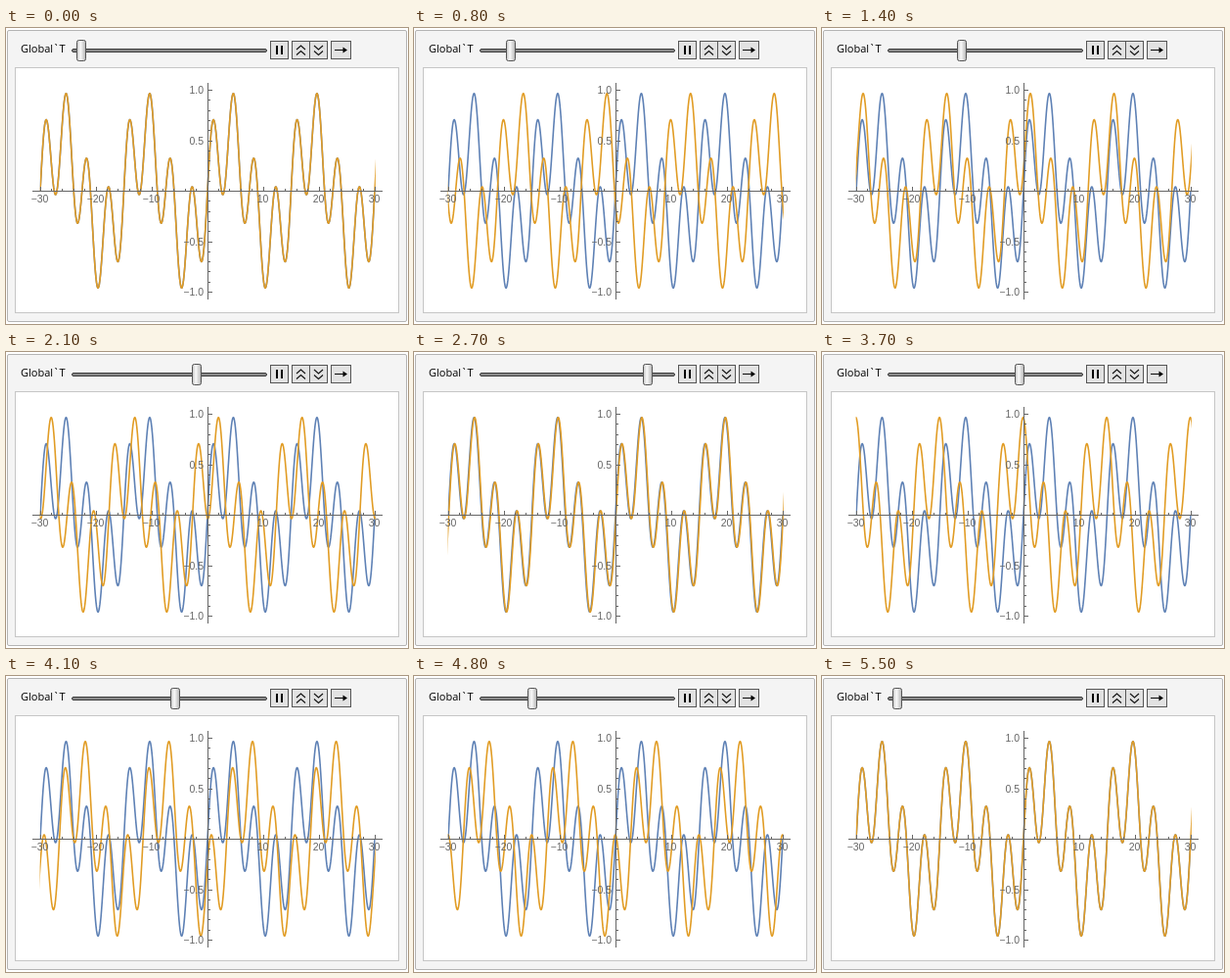
An HTML page for the animation above (6 s loop, 411 by 302 pixels).

```html
<!DOCTYPE html>
<html lang="en">
<head>
<meta charset="utf-8">
<title>Travelling wave</title>
<style>
  html, body { margin: 0; width: 100%; height: 100%; overflow: hidden; background: #fff; }
  svg { display: block; }
  .label { font: 11px "Open Sans", sans-serif; fill: #000; }
  #axes text { font: 10.5px "Liberation Sans", Arial, sans-serif; fill: #666; }
  #axes path { stroke: #666; fill: none; shape-rendering: crispEdges; }
  .curve { fill: none; stroke-width: 1.6; stroke-linejoin: round; }
  .button { fill: #e2e2e2; stroke: #555; }
  .icon { fill: none; stroke: #111; stroke-width: 1.1; }
</style>
</head>
<body>
<svg width="411" height="302" viewBox="0 0 411 302">
  <defs>
    <linearGradient id="metal">
      <stop offset="0" stop-color="#c4c4c4"/>
      <stop offset=".4" stop-color="#fafafa"/>
      <stop offset="1" stop-color="#b4b4b4"/>
    </linearGradient>
    <clipPath id="plot"><rect x="34.6" y="42" width="343.2" height="247"/></clipPath>
  </defs>

  <rect x="1.5" y="2.5" width="408" height="297" rx="1.5" fill="#f4f4f4" stroke="#b4b4b4"/>
  <rect x="9.5" y="40.5" width="392" height="250" fill="#fff" stroke="#c6c6c6"/>

  <text class="label" x="15" y="25">Global`T</text>
  <rect x="67.5" y="21.5" width="199" height="3" rx="1.5" fill="#8a8a8a" stroke="#3c3c3c"/>
  <rect id="thumb" x="-4.5" y="12.5" width="9" height="21" rx="2" fill="url(#metal)" stroke="#555"/>

  <g class="button">
    <rect x="270.5" y="13.5" width="18" height="18"/>
    <rect x="292.5" y="13.5" width="18" height="18"/>
    <rect x="310.5" y="13.5" width="18" height="18"/>
    <rect x="332.5" y="13.5" width="20" height="18"/>
  </g>
  <path d="M276 18h2v9h-2zM281 18h2v9h-2z"/>
  <path class="icon" d="M297 22l4.500-4 4.500 4M297 27.500l4.500-4 4.500 4"/>
  <path class="icon" d="M315 18l4.500 4 4.500-4M315 23.500l4.500 4 4.500-4"/>
  <path class="icon" d="M336 22.500h10"/>
  <path d="M344.500 19.500l4.500 3-4.500 3z"/>

  <g clip-path="url(#plot)">
    <path id="fixed" class="curve" stroke="#5e81b5"/>
    <path id="moving" class="curve" stroke="#e19c24"/>
  </g>
  <g id="axes"></g>
</svg>
<script>
const $ = id => document.getElementById(id);
const X0 = 206, Y0 = 166, UX = 5.7, UY = 103;
const T_MIN = 0.05, T_MAX = 50, SAMPLES = 50;

const wave = x => Math.sin(Math.PI * x / 3) * Math.cos(Math.PI * x / 5);

function curve(from, to) {
  const points = [];
  for (let i = from * 10; i <= to * 10; i++) {
    const x = i / 10;
    points.push((X0 + x * UX).toFixed(2) + ' ' + (Y0 - wave(x) * UY).toFixed(2));
  }
  return 'M' + points.join('L');
}

function drawAxes() {
  let d = 'M27 166.5H385M206.5 56V277';
  let labels = '';
  const text = (x, y, anchor, value) => {
    labels += `<text x="${x}" y="${y}" text-anchor="${anchor}">${value.replace('-', '\u2212')}</text>`;
  };
  for (let v = -30; v <= 30; v += 2) {
    const x = Math.floor(X0 + v * UX) + 0.5, major = v % 10 === 0;
    d += `M${x} 166v${major ? -4 : -2}`;
    if (major && v) text(X0 + v * UX - 0.5, 178, 'middle', String(v));
  }
  for (let n = -10; n <= 10; n++) {
    const y = Math.round(Y0 - n / 10 * UY) + 0.5, major = n % 5 === 0;
    d += `M207 ${y}h${major ? 4 : 2}`;
    if (major && n) text(202, y + 3, 'end', (n / 10).toFixed(1));
  }
  $('axes').innerHTML = `<path d="${d}"/>` + labels;
}

// T sweeps up and back in 100 ms steps, resting at zero for 500 ms at each end.
function valueAt(ms) {
  const step = Math.floor(ms / 100) - 5;
  if (step < 0 || step >= SAMPLES) return 0;
  const rise = 1 - Math.abs(2 * step / (SAMPLES - 1) - 1);
  return T_MIN + (T_MAX - T_MIN) * rise;
}

function render() {
  const T = valueAt(performance.now() % 6000);
  $('moving').setAttribute('transform', `translate(${-T * UX} 0)`);
  $('thumb').setAttribute('transform', `translate(${Math.round(77.35 + 3.59 * T)} 0)`);
  requestAnimationFrame(render);
}

$('fixed').setAttribute('d', curve(-30, 30));
$('moving').setAttribute('d', curve(-30, 30 + T_MAX));
drawAxes();
render();
</script>
</body>
</html>
```
